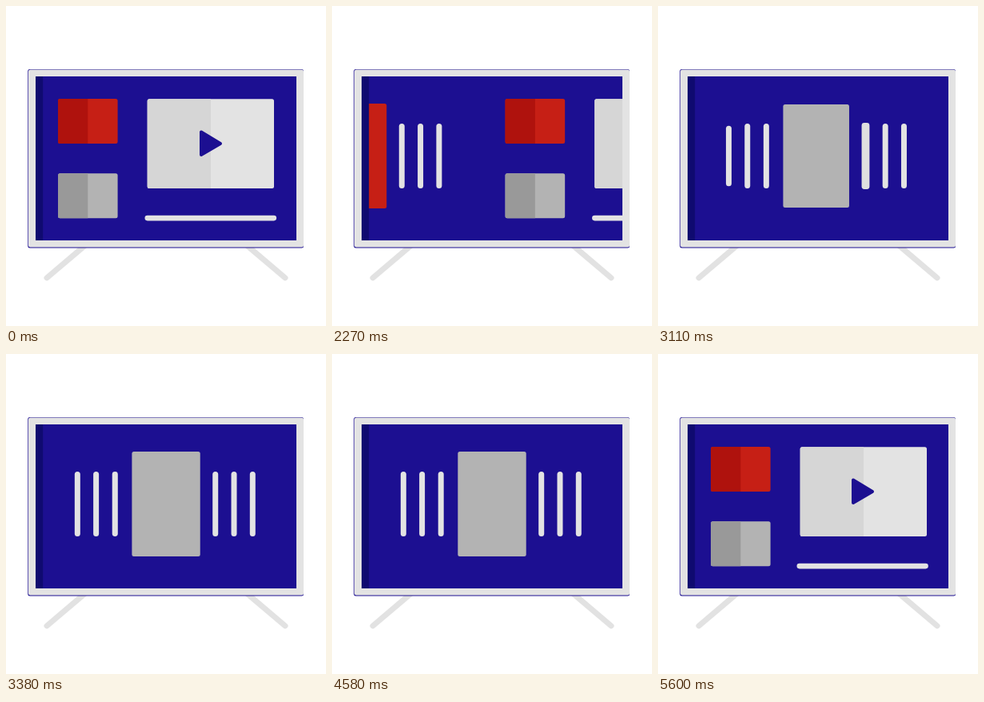
Animation, 400 px wide and 400 px high, one loop 5.63 s. Source, as an HTML page:

```html
<!DOCTYPE html>
<html lang="en">
<head>
<meta charset="utf-8">
<title>TV</title>
<style>
  html, body { margin: 0; width: 100%; height: 100%; overflow: hidden; background: #fff; }
  svg { display: block; width: 100vw; height: 100vh; }
</style>
</head>
<body>
<svg viewBox="0 0 400 400">
  <defs>
    <clipPath id="screen"><rect x="37" y="88" width="326" height="205"/></clipPath>
  </defs>
  <path d="M51 339.8L98 300M349 339.8L302 300" stroke="#e2e2e2" stroke-width="7" stroke-linecap="round"/>
  <rect x="27.3" y="79" width="344.7" height="223.4" rx="2.5" fill="#1c0f91"/>
  <rect x="28" y="79.4" width="344" height="222.2" rx="2.5" fill="#e3e3e3"/>
  <rect x="37" y="88" width="326" height="205" fill="#1c0f91"/>
  <g clip-path="url(#screen)">
    <g id="menu">
      <g id="red">
        <rect x="65" y="116" width="74.6" height="56" rx="2.5" fill="#c61f15"/>
        <path d="M102.3 116H67.5a2.5 2.5 0 0 0-2.5 2.5v51a2.5 2.5 0 0 0 2.5 2.5h34.8z" fill="#af120d"/>
      </g>
      <g id="grey">
        <rect x="65" y="209.2" width="74.6" height="56" rx="2.5" fill="#b3b3b3"/>
        <path d="M102.3 209.2H67.5a2.5 2.5 0 0 0-2.5 2.5v51a2.5 2.5 0 0 0 2.5 2.5h34.8z" fill="#999"/>
      </g>
      <g id="video">
        <rect x="176.7" y="116.2" width="158.3" height="111.8" rx="2.5" fill="#e3e3e3"/>
        <path d="M256 116.2H179.2a2.5 2.5 0 0 0-2.5 2.5v106.8a2.5 2.5 0 0 0 2.5 2.5H256z" fill="#d6d6d6"/>
      </g>
      <path id="play" d="M244 157.5V186L268 172z" fill="#1c0f91" stroke="#1c0f91" stroke-width="4" stroke-linejoin="round"/>
      <rect id="line" x="173.5" y="261.8" width="164.6" height="6.6" rx="3.3" fill="#e3e3e3"/>
    </g>
    <g id="row"></g>
    <rect x="37" y="88" width="9.2" height="205" fill="#0f0a70"/>
  </g>
</svg>
<script>
const LOOP = 5630, STEP = 30, OFFSET = 20;
const SCREEN_W = 326, MID_Y = 187.5;
const BAR = [7, 81], CARD = [85.4, 131];
const SLOTS = [65.8, 89.3, 112.6, 136.2, 200, 261.7, 285, 308.3];
const LIGHT = [227, 227, 227], RED = [198, 31, 21], GREY = [179, 179, 179];
const SWAPS = [2557, 3067, 3577], SWAP_MS = 320;

const $ = id => document.getElementById(id);
const clamp = v => Math.min(1, Math.max(0, v));
const part = (t, start, ms) => clamp((t - start) / ms);
const mix = (a, b, p) => a + (b - a) * p;
const inOut = p => p < .5 ? 2 * p * p : 1 - 2 * (1 - p) ** 2;
const out = p => 1 - (1 - p) ** 2;
const tint = (a, b, p) => `rgb(${a.map((v, i) => Math.round(mix(v, b[i], p)))})`;

const items = Array.from({ length: 8 }, () => {
  const r = document.createElementNS('http://www.w3.org/2000/svg', 'rect');
  $('row').append(r);
  return r;
});

function box(el, x, y, w, h, fill) {
  const a = { x: x - w / 2, y: y - h / 2, width: w, height: h, rx: mix(3.5, 2.5, clamp((w - 7) / 20)), fill };
  for (const k in a) el.setAttribute(k, a[k]);
}

function scaleAt(id, x, y, sx, sy, dx = 0) {
  $(id).setAttribute('transform', `translate(${x + dx} ${y}) scale(${sx} ${sy}) translate(${-x} ${-y})`);
}

function drawMenu(t) {
  const back = t >= 4870;
  const shift = back ? 0 : SCREEN_W * inOut(part(t, 2000, 560));
  $('menu').setAttribute('transform', `translate(${shift} 0)`);
  $('menu').style.display = t > 2560 && !back ? 'none' : '';
  const grow = ms => back ? out(part(t, 4870, ms)) : 1;
  const s = grow(621), p = grow(553), dx = back ? 1 : 0;
  scaleAt('red', 65, 228, 1, s, dx);
  scaleAt('grey', 65, 265.2, 1, s, dx);
  scaleAt('video', 177, 228, 1, s, dx);
  scaleAt('play', 175, 235, p, p);
  $('line').setAttribute('width', 164.6 * grow(760));
}

// Each swap moves every item one slot to the left.
function drawRow(t) {
  const shown = t > 2000 && t < 4880;
  $('row').style.display = shown ? '' : 'none';
  if (!shown) return;
  const slide = SCREEN_W * (inOut(part(t, 2000, 560)) - 1);
  $('row').setAttribute('transform', `translate(${slide} 0)`);

  const n = SWAPS.filter(s => t >= s).length;
  const p = n ? inOut(part(t, SWAPS[n - 1], SWAP_MS)) : 1;
  const hop = 21 * Math.sin(Math.PI * part(t, 4290, 290));
  const size = 1 - part(t, 4670, 210) ** 2;

  items.forEach((el, i) => {
    let x = mix(SLOTS[Math.min(i + 1, 7)], SLOTS[i], p);
    let [w, h] = BAR, y = MID_Y, fill = tint(LIGHT, LIGHT, 0);
    if (i === 0) {
      h = 7 + 74 * clamp(1 - 2 * p);
      if (p > .54) w = h = 0;
    } else if (i === 7) {
      h = p > .5 ? 7 + 74 * (2 * p - 1) : 0;
    } else if (i === 3 || i === 4) {
      const k = i === 4 ? p : 1 - p;
      const color = n === 0 || (n === 1 && i === 3) ? RED : GREY;
      w = mix(BAR[0], CARD[0], k);
      h = mix(BAR[1], CARD[1], k);
      fill = tint(LIGHT, color, clamp(k / .4));
      if (i === 4) y -= hop;
    }
    if (i === 4) w *= size;
    box(el, x, y, size > 0 ? w : 0, h * size, fill);
  });
}

function frame(now) {
  const raw = now % LOOP;
  const t = Math.max(0, Math.floor((raw - OFFSET) / STEP) * STEP + OFFSET);
  drawMenu(t);
  drawRow(t);
}

const start = performance.now();
function tick() {
  frame(performance.now() - start);
  requestAnimationFrame(tick);
}
tick();
</script>
</body>
</html>
```
